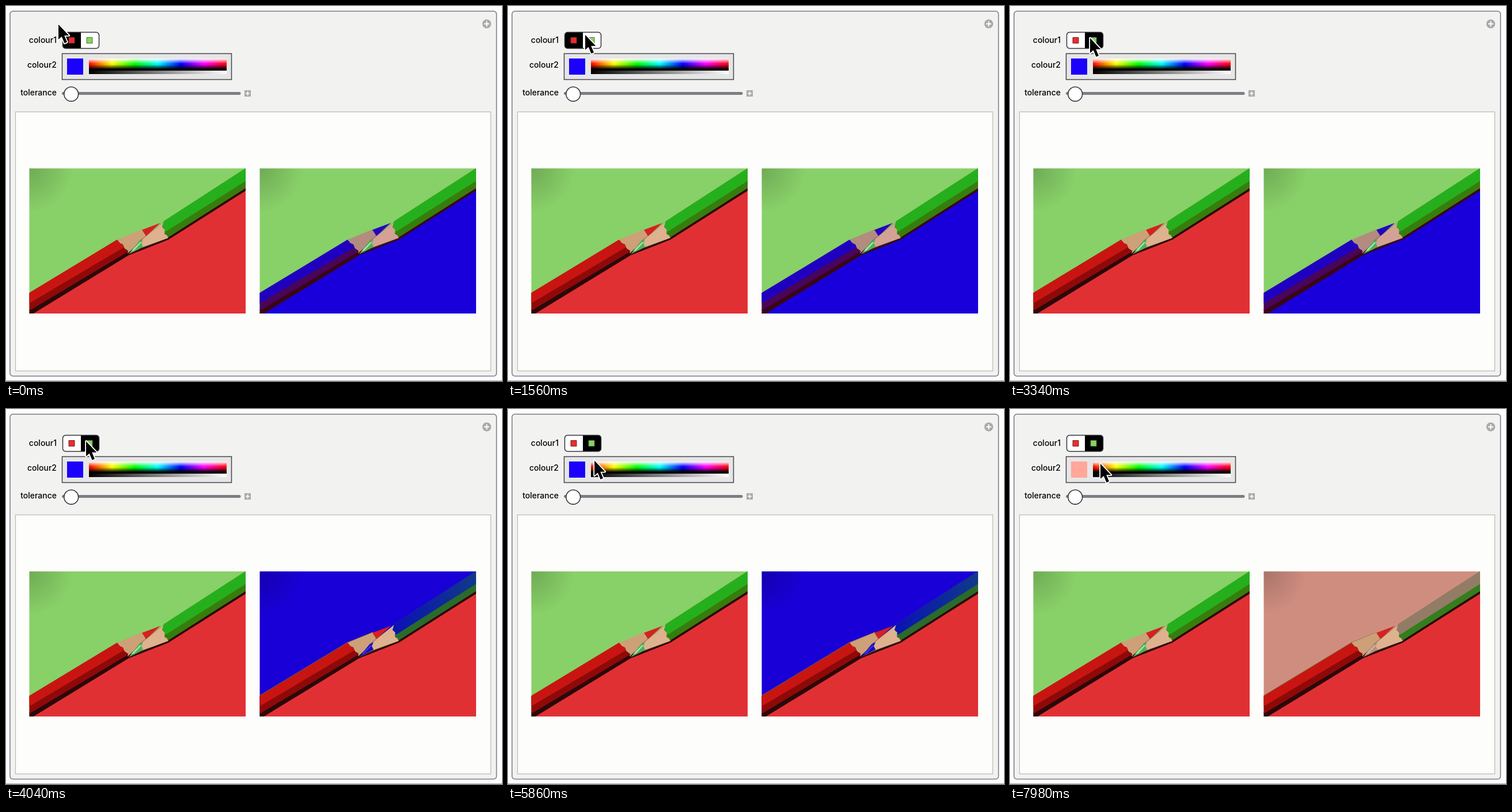
Recreate the animation shown at these times as an HTML page. Size 861x650 px, loop 8000 ms.

```html
<!DOCTYPE html>
<html lang="en">
<head>
<meta charset="utf-8">
<style>
  html, body { margin: 0; width: 100%; height: 100%; overflow: hidden; background: #fdfdfd; }
  svg { display: block; width: 861px; height: 650px; }
  text { font-family: Inter, "Open Sans", sans-serif; font-weight: 500; fill: #000; }
  .label { font-size: 14px; text-anchor: end; }
  #tip { filter: drop-shadow(0 8px 12px rgba(0, 0, 0, .4)); }
  #tip text { font-size: 16.8px; fill: #111; }
</style>
</head>
<body>
<svg viewBox="0 0 861 650">
  <defs>
    <linearGradient id="hues"></linearGradient>
    <linearGradient id="shade" x2="0" y2="1">
      <stop offset="0" stop-color="#fff"/>
      <stop offset=".42" stop-color="#fff" stop-opacity="0"/>
      <stop offset=".48" stop-color="#000" stop-opacity="0"/>
      <stop offset=".88" stop-color="#000"/>
    </linearGradient>
    <linearGradient id="greys"><stop/><stop offset="1" stop-color="#fff"/></linearGradient>
    <linearGradient id="navy"><stop stop-color="#0a12b4"/><stop offset="1" stop-color="#103a88"/></linearGradient>
    <radialGradient id="corner" gradientUnits="userSpaceOnUse" cx="41" cy="282" r="75">
      <stop stop-opacity=".18"/><stop offset="1" stop-opacity="0"/>
    </radialGradient>
    <clipPath id="frame"><path d="M40.5 281.5H416V533H40.5z"/></clipPath>
    <clipPath id="setter"><rect x="98.5" y="45.5" width="63" height="28" rx="5"/></clipPath>
  </defs>

  <path d="M0 649.5H861" stroke="#a5a5a5"/>
  <rect x="7" y="9" width="844.5" height="632.5" rx="5" fill="#f2f2f1" stroke="#777987" stroke-width="1.5"/>
  <rect x="16.5" y="183.5" width="825" height="449" fill="#fdfdfc" stroke="#b9baa8" stroke-width="1.2"/>
  <circle cx="834.5" cy="31" r="7.7" fill="#aaa"/>
  <path d="M834.5 26.5v9M830 31h9" stroke="#fff" stroke-width="2"/>

  <text class="label" x="88" y="64">colour1</text>
  <text class="label" x="88" y="107">colour2</text>
  <text class="label" x="88" y="155">tolerance</text>

  <g clip-path="url(#setter)">
    <path id="left" d="M98 45h32v30h-32z"/>
    <path id="right" d="M130 45h32v30h-32z"/>
  </g>
  <rect x="98.5" y="45.5" width="63" height="28" rx="5" fill="none" stroke="#34343c" stroke-width="1.5"/>
  <path d="M109 54.5h10v10h-10z" fill="#e23033" stroke="#8a1d1f"/>
  <path d="M140 54.5h10v10h-10z" fill="#88d267" stroke="#4d7c39"/>

  <path d="M97.5 82.5h294v45h-294z" fill="#e6e6e6" stroke="#45454b" stroke-width="1.5"/>
  <path id="swatch" d="M106 91h28v28h-28z"/>
  <path d="M144 91h239v21h-239z" fill="url(#hues)"/>
  <path d="M144 91h239v21h-239z" fill="url(#shade)"/>
  <path d="M144 112h239v6h-239z" fill="url(#greys)"/>

  <path d="M99.5 151.5H405" stroke="#7d7d83" stroke-width="5" stroke-linecap="round"/>
  <circle cx="113.2" cy="152.7" r="12.4" fill="#fff" stroke="#38383c" stroke-width="1.6"/>
  <path d="M414 146h11v11h-11z" fill="#aaa"/>
  <path d="M419.5 148v7M416 151.5h7" stroke="#fff" stroke-width="1.7"/>

  <g id="photos"></g>

  <g id="tip">
    <path d="M151.5 89.5h356.5v32.5h-356.5z" fill="#f1f1f1" stroke="#3c3c3c" stroke-width="1.5"/>
    <text x="157.5" y="111.5">RGBColor[0.587694, 0.840598, 0.450622]</text>
  </g>
  <path id="cursor" d="M0 0V26L5.7 21L10.5 32.5L15 30.6L10.2 19.3H18.3z" stroke="#fff" stroke-width="3.6" paint-order="stroke" stroke-linejoin="round"/>
</svg>
<script>
const $ = id => document.getElementById(id);
const shape = (d, fill) => `<path d="${d}" fill="${fill}"/>`;

$('hues').innerHTML = ['f00', 'ff0', '0f0', '0ff', '00f', 'f0f', 'f00']
  .map((c, i) => `<stop offset="${i / 6}" stop-color="#${c}"/>`).join('');

const natural = {
  paper: '#88d068', card: '#e13034', shadow: '#2b0808', rim: 'none',
  redTop: '#c81512', redSide: '#8f0909', redLead: '#d5211f', redWood: '#cda078',
  greenTop: '#26af1c', greenSide: '#377d0d', greenLead: '#48b456', greenWood: '#deb18f', glint: '#a9e5ad'
};
const redToBlue = {
  ...natural, card: '#1900da', shadow: '#3a0614', redTop: '#2000c0', redSide: '#48055a',
  redLead: '#2405bd', redWood: '#b48b80', greenWood: '#d3a294'
};
const greenToBlue = {
  ...natural, paper: '#1900d6', rim: '#83652d', greenTop: 'url(#navy)', greenSide: '#2a6b2a',
  greenLead: '#1a08c4', glint: '#3b35dc'
};
const greenToPink = {
  ...natural, paper: '#cf8d80', rim: '#7b7a35', greenTop: '#937c66', greenSide: '#347d1c',
  greenLead: '#b78f78', glint: '#d8b3a2'
};

function photo(id, x, c) {
  const whole = 'M40 281H417V534H40z';
  return `<g id="${id}" transform="translate(${x})"><g clip-path="url(#frame)">` +
    shape(whole, c.paper) +
    shape(whole, 'url(#corner)') +
    shape('M40 532L213 429L282 402L417 317V534H40z', c.card) +
    shape('M40 526L211 424L281 398L417 311V319.5L282 405L213 432L46 534H40z', c.shadow) +
    // red pencil
    shape('M40 497.5L193 405L198 411L203 413L206 420L212 424L210 427L40 528.5z', c.redSide) +
    shape('M40 497.5L193 405L198 411L203 413L205 418L40 515.5z', c.redTop) +
    `<path d="M40 497L193 404.5L237 387" fill="none" stroke="${c.rim}"/>` +
    shape('M193 405L237 387L241 393L245 398L211 429L212 424L206 420L203 413L198 411z', c.redWood) +
    shape('M236 388L268 376L243 399L240 394z', c.redLead) +
    // green pencil
    shape('M213 430L232 407L274 374L277 388L282 402z', '#36241b') +
    shape('M215 429L234 406L274 374L277 388L282 402L235 419z', c.greenWood) +
    shape('M213 430L231 408L238 404L235 411L238 417z', c.greenLead) +
    shape('M217 425L233 409L235 410L222 424z', c.glint) +
    shape('M274 373L417 280.5V315L281 401.5L280 398L275 395L276 388L271 383z', c.greenSide) +
    shape('M274 373L417 280.5V302.5L279 390L275 391L276 387L271 383z', c.greenTop) +
    '</g></g>';
}

$('photos').innerHTML = photo('before', 0, natural) + photo('swapRed', 400, redToBlue) +
  photo('swapGreen', 400, greenToBlue) + photo('swapPink', 400, greenToPink);

// [time, x, y] of the pointer tip
const path = [
  [0, 91, 32], [820, 123, 49], [1560, 134, 50], [2100, 139, 55], [4180, 139, 56],
  [4900, 148, 77], [5100, 148, 77], [5800, 150, 89], [6500, 151, 94], [7540, 152, 94], [7900, 157, 95], [8000, 157, 95]
];
const PRESS = 3000, SWAP = 3400, PICK = 7700;
const show = (id, on) => $(id).setAttribute('visibility', on ? 'visible' : 'hidden');
const paint = (id, colour) => $(id).setAttribute('fill', colour);

function draw(t) {
  const i = path.findIndex(p => p[0] > t);
  const [t0, x0, y0] = path[i - 1], [t1, x1, y1] = path[i];
  const k = (t - t0) / (t1 - t0);
  $('cursor').setAttribute('transform', `translate(${x0 + (x1 - x0) * k} ${y0 + (y1 - y0) * k})`);

  const greenChosen = t >= PRESS;
  paint('left', greenChosen ? '#fff' : '#000');
  paint('right', greenChosen ? '#000' : t >= 1680 ? '#cfcfd0' : '#fff');
  paint('swatch', t < PICK ? '#1b00fb' : '#ffa799');
  show('swapRed', t < SWAP);
  show('swapGreen', t >= SWAP && t < PICK);
  show('swapPink', t >= PICK);
  show('tip', t >= 4700 && t < 5600);
}

const start = performance.now();
function tick() {
  draw((performance.now() - start) % 8000);
  requestAnimationFrame(tick);
}
tick();
</script>
</body>
</html>
```
